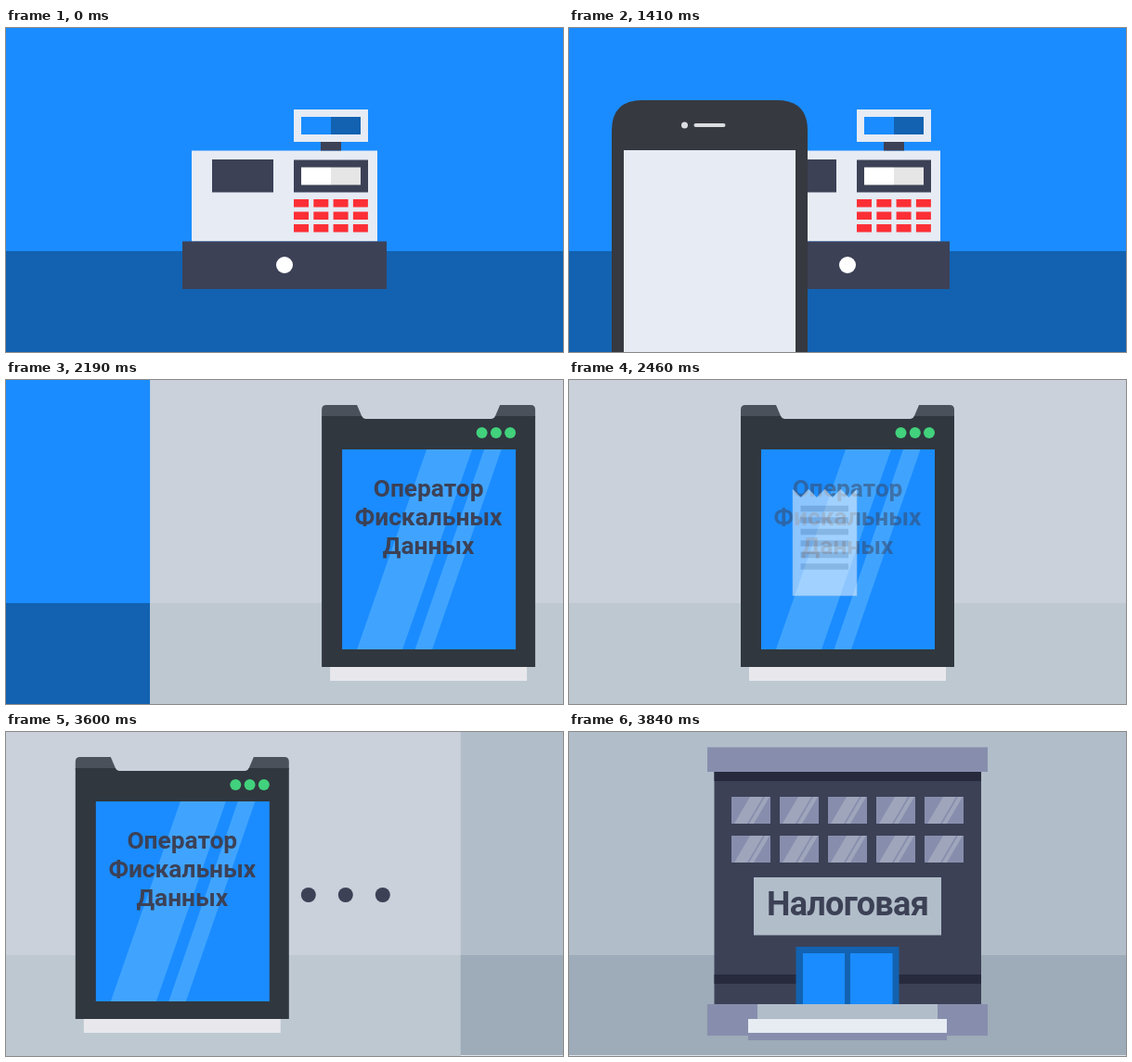
Write an HTML page that moves like this. It is 600 px wide and 350 px high and loops after 4.5 s.

```html
<!DOCTYPE html>
<html lang="ru">
<head>
<meta charset="utf-8">
<title>Электронный чек</title>
<style>
  html, body { margin: 0; width: 100%; height: 100%; overflow: hidden; }
  svg { display: block; width: 100vw; height: 100vh; }
  text { font-family: Roboto, "Open Sans", sans-serif; font-weight: 700; text-anchor: middle; }
</style>
</head>
<body>
<svg viewBox="0 0 600 350">
  <defs>
    <clipPath id="slot"><rect width="600" height="163"/></clipPath>
    <g id="paper">
      <path fill="#fff" stroke="#d9dde2" stroke-width=".6" d="M241 118l8.6 9 8.6-9 8.6 9 8.7-9 8.6 9 8.6-9 8.7 9 8.6-9V233H241Z"/>
      <path stroke="#cbc9cb" stroke-width="6.3" d="M249.500 139H301M249.500 151.500H301M249.500 164H301M249.500 176.500H301M249.500 189H301M249.500 201.500H301"/>
    </g>
  </defs>

  <g id="shop">
    <rect width="601" height="350" fill="#1a8cff"/>
    <rect y="241" width="601" height="109" fill="#1262b1"/>
    <g id="shopDots" fill="#3c4156"></g>
    <g id="waves" fill="none" stroke="#e6ebf4" stroke-width="4" stroke-linecap="round"></g>
    <g fill="#e6ebf4">
      <rect x="310" y="88" width="80" height="35"/>
      <rect x="200" y="132.500" width="200" height="98"/>
    </g>
    <rect x="318" y="96" width="32" height="19" fill="#1a8cff"/>
    <rect x="350" y="96" width="32" height="19" fill="#1262b1"/>
    <g fill="#3c4156">
      <rect x="339" y="123" width="22" height="9.500"/>
      <rect x="222" y="142" width="66" height="35.500"/>
      <rect x="310" y="142.500" width="80" height="35"/>
      <rect x="190" y="230.500" width="220" height="51.500"/>
    </g>
    <rect x="318" y="150.500" width="32" height="19" fill="#fff"/>
    <rect x="350" y="150.500" width="32" height="19" fill="#e6e6e6"/>
    <g id="keys" fill="#fc2f36"></g>
    <circle cx="300" cy="256" r="9" fill="#fff"/>
    <g clip-path="url(#slot)"><use id="ticket" href="#paper"/></g>

    <g id="phone">
      <path fill="#36393f" d="M46 350V111q0-33 33-33H224q33 0 33 33V350Z"/>
      <circle cx="124.500" cy="105" r="3.500" fill="#dcdde1"/>
      <rect x="134.500" y="103" width="34" height="4" rx="2" fill="#dcdde1"/>
      <rect x="59" y="132" width="185" height="218" fill="#e6ebf4"/>
      <g id="sms">
        <rect x="73" y="191" width="157" height="100" rx="19" fill="#fff"/>
        <path fill="#1a8cff" d="M73 221V208q0-17 17-17H213q17 0 17 17V221Z"/>
        <text x="151.500" y="213" font-size="16.500" fill="#fff">СМС</text>
        <g font-size="17" fill="#b1bdcb">
          <text x="149.500" y="249">Ваш</text>
          <text x="151.500" y="270">электронный чек</text>
        </g>
      </g>
    </g>
  </g>

  <g id="operator">
    <rect width="601" height="350" fill="#cad1db"/>
    <rect y="241" width="601" height="109" fill="#bdc8d1"/>
    <g id="operatorDots" fill="#3c4156"></g>
    <rect x="194" y="309" width="212" height="16" fill="#e8e8ec"/>
    <path fill="#4a515b" d="M185 40V32q0-5 5-5H223L228.500 40ZM415 40V32q0-5-5-5H377L371.500 40Z"/>
    <path fill="#30373f" d="M185 39H228q1.500 3 4 3H368q2.500 0 4-3H415V310H185Z"/>
    <g fill="#42d17c">
      <circle cx="357.500" cy="57" r="6"/><circle cx="372.800" cy="57" r="6"/><circle cx="388" cy="57" r="6"/>
    </g>
    <rect x="207" y="75" width="187" height="216" fill="#1a8cff"/>
    <path fill="#40a4ff" d="M298 75H347L272 291H223ZM360 75H378.500L304 291H285.500Z"/>
    <g id="title" font-size="26.300" fill="#3c4156">
      <text x="300" y="126">Оператор</text>
      <text x="300" y="157">Фискальных</text>
      <text x="300" y="188">Данных</text>
    </g>
    <g id="receipt">
      <use href="#paper"/>
      <circle id="badge" cx="324" cy="185" r="35.500" fill="#93cf57"/>
      <path id="tick" fill="#fff" d="M302 182L311 174 322 186.500 360 156 367 165 322 201Z"/>
    </g>
  </g>

  <g id="office">
    <rect width="600" height="350" fill="#b1bdc9"/>
    <rect y="241" width="600" height="108" fill="#9eabb8"/>
    <rect y="349" width="600" height="1" fill="#dfe4e9"/>
    <rect x="156.500" y="43" width="287.500" height="251" fill="#3c4156"/>
    <path fill="#272a3d" d="M156.500 43H444V53H156.500ZM156.500 262H444V272H156.500Z"/>
    <path fill="#878ead" d="M149 16.500H451V43H149ZM149 294H451V328H149Z"/>
    <g id="windows"></g>
    <rect x="199" y="157" width="202" height="62.500" fill="#b1bdc9"/>
    <text x="300" y="198" font-size="36" letter-spacing="-.7" fill="#3c4156">Налоговая</text>
    <rect x="244.500" y="232" width="111" height="62.500" fill="#1262b1"/>
    <path fill="#1a8cff" d="M252 239H297V294H252ZM303 239H348.500V294H303Z"/>
    <rect x="203" y="294" width="194" height="16" fill="#b1bdc9"/>
    <rect x="193" y="310" width="214" height="15" fill="#e6ecf2"/>
    <rect x="193" y="325" width="214" height="8" fill="#878ead"/>
  </g>
</svg>
<script>
const LOOP = 4500, STEP = 30, WIDTH = 600;
const $ = id => document.getElementById(id);

function add(parent, tag, attrs) {
  const el = document.createElementNS('http://www.w3.org/2000/svg', tag);
  for (const key in attrs) el.setAttribute(key, attrs[key]);
  return parent.appendChild(el);
}

for (let i = 0; i < 12; i++) {
  add($('keys'), 'rect', {
    x: 310 + (i % 4) * 21.3, y: 185 + Math.floor(i / 4) * 13.5, width: 16, height: 8.5
  });
}

const waves = [16, 33, 50, 67].map(r =>
  add($('waves'), 'path', { d: `M409 ${126 - r}a${r} ${r} 0 0 1 ${r} ${r}` }));

for (let i = 0; i < 10; i++) {
  const pane = add($('windows'), 'g', {
    transform: `translate(${175 + (i % 5) * 52} ${i < 5 ? 70 : 112})`
  });
  add(pane, 'rect', { width: 42, height: 29, fill: '#878ead' });
  add(pane, 'path', { d: 'M20 0H34L17 29H3ZM36 0H41L24 29H19Z', fill: '#9fa5bb' });
}

const makeDots = id => [0, 1, 2].map(() => add($(id), 'circle', { cy: 176, r: 8 }));
const shopDots = makeDots('shopDots');
const operatorDots = makeDots('operatorDots');

const span = (t, from, to) => Math.min(1, Math.max(0, (t - from) / (to - from)));
const smooth = p => p * p * (3 - 2 * p);
const backOut = (p, s) => 1 + (s + 1) * (p - 1) ** 3 + s * (p - 1) ** 2;

const show = (el, on) => el.setAttribute('visibility', on ? 'visible' : 'hidden');
const move = (id, x, y = 0) => $(id).setAttribute('transform', `translate(${x} ${y})`);

function scale(id, k, x, y) {
  show($(id), k > 0.001);
  $(id).setAttribute('transform', `translate(${x} ${y}) scale(${k}) translate(${-x} ${-y})`);
}

function runDots(dots, lead, hideBelow) {
  dots.forEach((dot, i) => {
    const x = lead - i * 40;
    dot.setAttribute('cx', x);
    show(dot, x > hideBelow);
  });
}

function draw(t) {
  // Scenes push each other to the left
  const first = WIDTH * span(t, 1972, 2266);
  const second = WIDTH * span(t, 3546, 3840);
  move('shop', -first);
  move('operator', WIDTH - first - second);
  move('office', WIDTH - second);

  // Paper leaves the printer upwards
  const rise = span(t, 270, 690) ** 1.4;
  const k = 44 / 69;
  show($('ticket'), rise > 0 && rise < 1);
  $('ticket').setAttribute('transform',
    `translate(255 ${163 - 237 * rise}) scale(${k}) translate(-275.500 -118)`);

  waves.forEach((wave, i) => show(wave, t >= 1050 + i * 60 && t < 1290));
  move('phone', -257 * (1 - span(t, 1260, 1410)));
  scale('sms', backOut(span(t, 1560, 1890), 1.2), 151.5, 241);

  runDots(shopDots, 433 + 1.1 * (t - 1950), 370);
  runDots(operatorDots, 516 + 1.1 * (t - 3600), 370);

  const swap = smooth(span(t, 2310, 2610)) - span(t, 3150, 3360);
  $('title').setAttribute('opacity', 1 - swap);
  $('receipt').setAttribute('opacity', swap);
  const fading = swap > 0;
  scale('badge', fading ? backOut(span(t, 2670, 2880), 1.1) : 0, 324, 185);
  scale('tick', fading ? backOut(span(t, 2850, 3030), 2.7) : 0, 334.5, 178);
}

const start = performance.now();
function tick() {
  const t = (performance.now() - start) % LOOP;
  draw(Math.floor(t / STEP) * STEP);
  requestAnimationFrame(tick);
}
tick();
</script>
</body>
</html>
```
